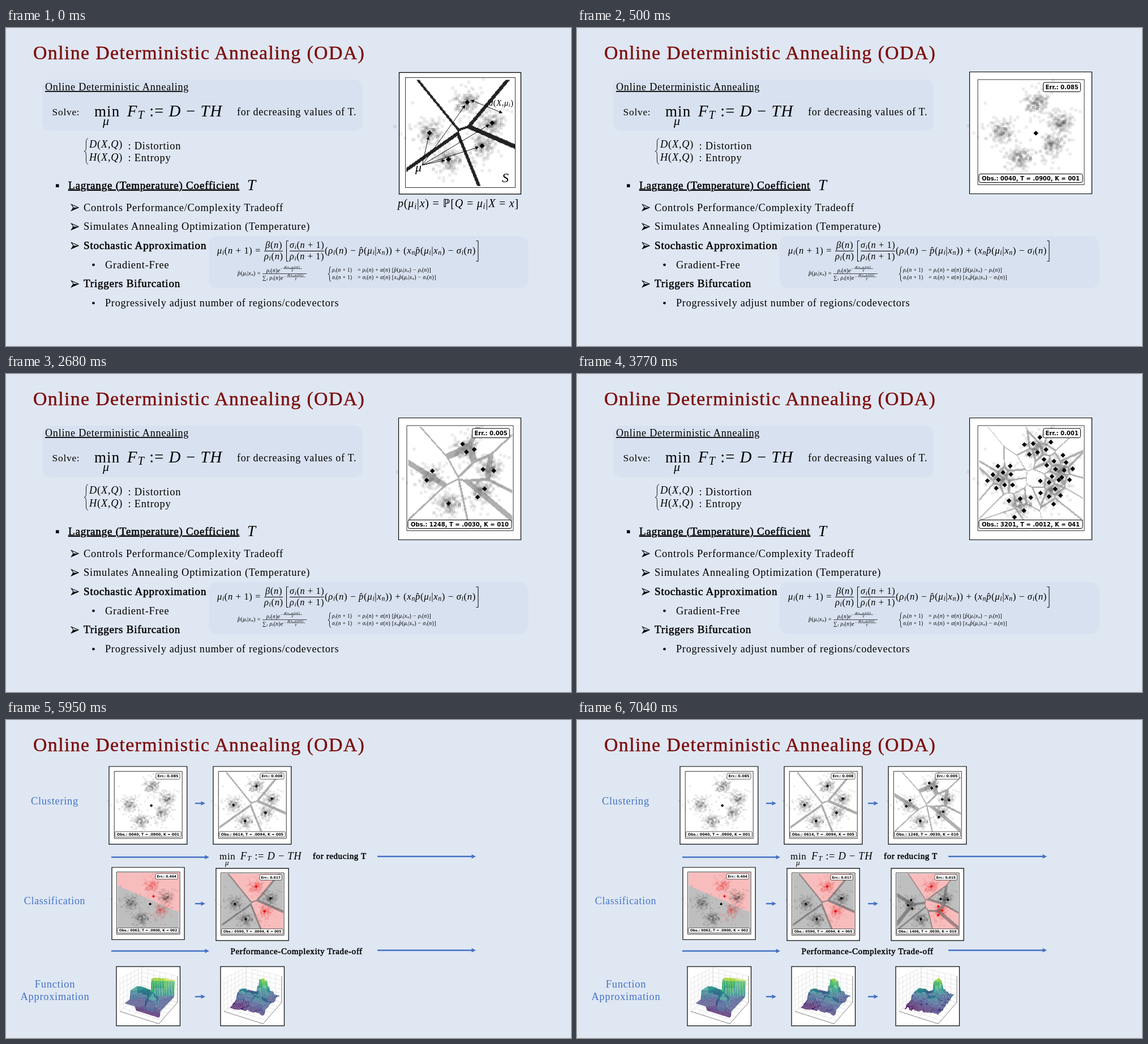
These frames come from a looping animation (998 by 561 pixels, 8000 ms). An HTML page:

```html
<!DOCTYPE html>
<html lang="en">
<head>
<meta charset="utf-8">
<title>Online Deterministic Annealing</title>
<style>
html, body { margin: 0; height: 100%; overflow: hidden; background: #dfe7f3; }
svg { display: block; width: 100vw; height: 100vh; }
text { font-family: "Liberation Serif", serif; letter-spacing: .04em; }
.i { font-style: italic; }
.sub { font-style: italic; font-size: .7em; baseline-shift: -.18em; }
.b { stroke: #000; stroke-width: .55; }
.u { text-decoration: underline; }
.title { fill: #7b0c08; stroke: #7b0c08; stroke-width: .4; }
.blue { fill: #4472c4; text-anchor: middle; }
.lab { font: bold 10px "DejaVu Sans", sans-serif; letter-spacing: 0; text-anchor: middle; }
.line { fill: none; stroke: #000; vector-effect: non-scaling-stroke; }
</style>
</head>
<body>
<svg id="stage" viewBox="0 0 998 561" preserveAspectRatio="none"></svg>
<script>
const LOOP = 8000, STEP = 1090, BLUE = '#4472c4';

let seed = 11;
const rnd = () => (seed = (seed * 16807) % 2147483647) / 2147483647;
const gauss = () => (rnd() + rnd() + rnd() + rnd() - 2) * 1.73;
const range = n => [...Array(n).keys()];

// ---------- text and line helpers ----------
const text = (x, y, size, s, cls = '') =>
  `<text x="${x}" y="${y}" font-size="${size}" class="${cls}">${s}</text>`;

// Letters become italic, "_x" becomes a subscript.
const math = (x, y, size, s) => text(x, y, size, s.replace(/_(.)|([A-Za-zα-ω]\u0302?)/g,
  (m, sub, ch) => `<tspan class="${sub ? 'sub' : 'i'}">${sub || ch}</tspan>`));

const path = (d, w = 1, col = '#000') => `<path d="${d}" fill="none" stroke="${col}" stroke-width="${w}"/>`;
const box = (x, y, w, h, r, fill) => `<rect x="${x}" y="${y}" width="${w}" height="${h}" rx="${r}" fill="${fill}"/>`;

function arrow(x1, y1, x2, y2, w, len, col, both) {
  const a = Math.atan2(y2 - y1, x2 - x1), c = Math.cos(a) * len * .8, s = Math.sin(a) * len * .8;
  const head = (x, y, angle) => `<path transform="translate(${x} ${y}) rotate(${angle * 180 / Math.PI})"
    d="M0 0L${-len} ${len / 2}V${-len / 2}z" fill="${col}"/>`;
  return path(`M${x1 + (both ? c : 0)} ${y1 + (both ? s : 0)}L${x2 - c} ${y2 - s}`, w, col) +
    head(x2, y2, a) + (both ? head(x1, y1, a + Math.PI) : '');
}
const blueArrow = (x, y, len) => arrow(x, y, x + len, y, 2.4, 7.5, BLUE);

function brace(x, y, h, w) {
  const m = y + h / 2, c = x + w / 2;
  return path(`M${x + w} ${y}Q${c} ${y} ${c} ${y + w}V${m - w}Q${c} ${m} ${x} ${m}` +
    `Q${c} ${m} ${c} ${m + w}V${y + h - w}Q${c} ${y + h} ${x + w} ${y + h}`, .9);
}

// ---------- cluster panels, local size 216 x 215 ----------
// Cluster centres: x, y, and 1 for the red class
const CENTRES = [[56, 106], [120, 54, 1], [162, 89], [145, 128, 1], [88, 151]];

// Each centre bifurcates into counts[k] code vectors on a golden-angle spiral.
const split = (counts, radius) => CENTRES.flatMap(([x, y, red], k) => range(counts[k]).map(i => {
  const n = counts[k], r = n > 1 ? radius * Math.sqrt((i + .5) / n) : 0, a = i * 2.4 + 2.6 - k;
  return [x + r * Math.cos(a), y + r * Math.sin(a), red];
}));

const clusterDefs = CENTRES.map(([cx, cy], k) => {
  const snap = v => Math.round(v / 2.5) * 2.5 - 2.7;
  const squares = range(150).map(n => {
    const sd = (n % 3 ? 9 : 17) * (k ? 1 : 1.2);
    return `<rect x="${snap(cx + gauss() * sd)}" y="${snap(cy + gauss() * sd)}" width="5.4" height="5.4"/>`;
  });
  return `<g id="c${k}" fill-opacity=".075">${squares.join('')}</g>`;
}).join('');

const scatter = twoClasses => CENTRES.map((p, k) =>
  `<use href="#c${k}" fill="${twoClasses && p[2] ? '#e00000' : '#000'}"/>`).join('');

// Cells of a fine grid for which test(nearest point, margin to the second) holds, as one path
function cells(pts, step, test) {
  let d = '';
  for (let y = 16; y < 196; y += step)
    for (let x = 17; x < 200; x += step) {
      let d1 = 1e9, d2 = 1e9, near;
      for (const p of pts) {
        const q = (p[0] - x) ** 2 + (p[1] - y) ** 2;
        if (q < d1) { d2 = d1; d1 = q; near = p; }
        else if (q < d2) d2 = q;
      }
      if (test(near, d2 - d1)) d += `M${x} ${y}h${step}v${step}h-${step}z`;
    }
  return d;
}
function borders(pts, fill) {
  const margin = pts.length < 3 ? 0 : 1250 / pts.length ** .85;
  return `<path d="${cells(pts, 1.25, (p, m) => m < margin)}" fill="${fill}"/>`;
}

const diamonds = (pts, twoClasses) => pts.map(([x, y, red]) =>
  `<path d="M${x} ${y - 4.3}l4.3 4.3l-4.3 4.3l-4.3 -4.3z" fill="${twoClasses && red ? '#f00000' : '#000'}"/>`).join('');

const label = (x, y, w, h, s) =>
  `<rect x="${x}" y="${y}" width="${w}" height="${h}" rx="3" fill="#fff" stroke="#000"/>` +
  text(x + w / 2, y + h / 2 + 3.6, 10, s, 'lab');

function panel(x, y, scale, [pts, err, obs, temp], twoClasses) {
  const k = String(pts.length).padStart(3, '0');
  const back = twoClasses ? box(17, 16, 183, 180.5, 0, '#c4c4c4') +
    `<path d="${cells(pts, 2, p => p[2])}" fill="#ffc2c2" shape-rendering="crispEdges"/>` +
    box(17, 16, 183, 180.5, 0, 'url(#dots)') : '';
  return `<g transform="translate(${x} ${y}) scale(${scale})">
    <rect class="line" width="216" height="215" style="fill:#fff" stroke-width="1.2"/>
    ${back}${scatter(twoClasses)}${borders(pts, twoClasses ? '#5558' : '#888a')}
    <rect class="line" x="14.5" y="13.5" width="188" height="185.5" stroke-width=".8"/>
    ${diamonds(pts, twoClasses)}
    ${label(130, 18.5, 66, 16.5, 'Err.: ' + err)}
    ${label(16.5, 180, 183, 15, `Obs.: ${obs}, T = ${temp}, K = ${k}`)}</g>`;
}

function annotated() {
  const rays = CENTRES.map(([x, y]) => {
    const px = 689.5 + x * 1.045, py = 74.8 + y * 1.04, a = Math.atan2(py - 242, px - 735);
    return arrow(735, 242, px - 6 * Math.cos(a), py - 6 * Math.sin(a), .9, 6, '#000');
  });
  return `<rect x="694.5" y="78.5" width="215" height="214.5" fill="#fff" stroke="#000" stroke-width="1.3"/>
    <rect x="705.5" y="87.5" width="194" height="194" fill="none" stroke="#000" stroke-width=".8"/>
    <g transform="translate(689.5 74.8) scale(1.045 1.04)">
    ${scatter()}${borders(CENTRES, '#222')}${diamonds(CENTRES)}</g>` +
    rays.join('') + arrow(821, 127, 877, 150, .9, 6, '#000', true) +
    math(723, 253, 22, 'μ') + math(876, 272, 24, 'S') + math(853, 137, 14.5, 'd(X,μ_i)') +
    math(692, 316, 20, 'p(μ_i|x) = ℙ[Q = μ_i|X = x]');
}

// ---------- surface plots ----------
const VIRIDIS = [[68, 1, 84], [59, 82, 139], [33, 145, 140], [94, 201, 98], [253, 231, 37]];
function viridis(t) {
  const s = Math.min(.999, Math.max(0, t)) * 4, i = s | 0;
  return `rgb(${VIRIDIS[i].map((c, k) => Math.round(c + (VIRIDIS[i + 1][k] - c) * (s - i)))})`;
}
const mix = (a, b, c, d, u, v) => (a * (1 - u) + b * u) * (1 - v) + (d * (1 - u) + c * u) * v;
const project = (u, v, z) => mix(6, 75, 108, 45, u, v).toFixed(1) + ' ' +
  (mix(79, 101, 63, 48, u, v) - z * (58 - 12 * v)).toFixed(1);

// Hills: u, v, height, width
const HILLS = [[.57, .85, .62, .09], [.2, .58, .36, .14], [.62, .48, .2, .13]];
const height = (u, v) => HILLS.reduce((z, [a, b, h, w]) =>
  z + h * Math.exp(-((u - a) ** 2 + (v - b) ** 2) / (2 * w * w)), .06 + .16 * u + .1 * v);

// Height is constant around each of some scattered sites; more sites give a finer surface.
function surface(x, count) {
  const sites = [...HILLS, ...range(count).map(() => [rnd(), rnd()])]
    .map(([u, v]) => [u, v, height(u, v) + (rnd() - .5) * .1]);
  const N = 30, lerp = k => .08 + .88 * k / N;
  const z = range(N + 1).map(i => range(N + 1).map(j => {
    const dist = s => (s[0] - lerp(i)) ** 2 + (s[1] - lerp(j)) ** 2;
    return sites.reduce((a, b) => dist(b) < dist(a) ? b : a)[2];
  }));
  const grid = range(7).map(k => k / 6).map(t =>
    `M${project(0, 0, t)}L${project(0, 1, t)}L${project(1, 1, t)}` +
    `M${project(0, t, 1)}L${project(0, t, 0)}L${project(1, t, 0)}` +
    `M${project(t, 1, 1)}L${project(t, 1, 0)}L${project(t, 0, 0)}`).join('');
  let quads = '';
  for (let j = N - 1; j >= 0; j--)
    for (let i = 0; i < N; i++) {
      const q = [[i, j], [i + 1, j], [i + 1, j + 1], [i, j + 1]];
      const mean = q.reduce((s, [a, b]) => s + z[a][b], 0) / 4;
      const d = q.map(([a, b]) => project(lerp(a), lerp(b), z[a][b])).join('L');
      quads += `<path d="M${d}z" fill="${viridis((mean - .08) * 1.2)}"/>`;
    }
  return `<g transform="translate(${x} 435)">
    <rect width="112.5" height="104.5" fill="#fff" stroke="#000" stroke-width="1.2"/>
    ${path(grid, .5, '#ccc')}<g fill-opacity=".86">${quads}</g>
    ${path(`M${project(0, 0, 0)}L${project(1, 0, 0)}L${project(1, 1, 0)}L${project(1, 1, 1)}`, .6, '#444')}</g>`;
}

// ---------- slides ----------
// Level 1 entries get an arrowhead, level 2 entries a dot.
const LIST = [
  [1, 18.5, 'Controls Performance/Complexity Tradeoff'],
  [1, 18.5, 'Simulates Annealing Optimization (Temperature)'],
  [1, 19.1, 'Stochastic Approximation', 'b'],
  [2, 18.5, 'Gradient-Free'],
  [1, 19.1, 'Triggers Bifurcation', 'b'],
  [2, 18.2, 'Progressively adjust number of regions/codevectors']
];
const list = LIST.map(([level, size, s, cls], k) => {
  const y = 322.5 + 33.7 * k, m = y - 5.8;
  return (level > 1 ? `<circle cx="154.5" cy="${m}" r="2.3"/>` :
    path(`M115.5 ${m - 5.5}L128 ${m}L115.5 ${m + 5.5}L119 ${m}z`, 1.1) +
    `<path d="M119 ${m}H128L115.5 ${m + 5.5}z"/>`) + text(level > 1 ? 175 : 137, y, size, s, cls);
}).join('');

// The tiny exponent -d(x,mu)/T, with its bar at height y
const exponent = (x, y) => text(x, y + 2, 7, '−') + math(x + 6, y - 1, 6.2, 'd(x_n,μ_i(n))') +
  path(`M${x + 5} ${y}h33`, .5) + math(x + 19, y + 5.5, 6, 'T');

const update = (y, s, rest) => math(576, y, 9.4, s + '_i(n + 1)') + math(621, y, 9.7, `= ${s}_i(n) + α(n) [${rest}]`);

const slideOne =
  box(64, 91, 566, 91, 15, '#d8e1f0') + box(358, 367, 564.5, 92, 15, '#d8e1f0') +
  text(69, 110, 18.2, 'Online Deterministic Annealing', 'u') +
  text(81.5, 154, 17.5, 'Solve:') + text(156, 156, 27, 'min') + math(171, 171, 22, 'μ') +
  math(214, 156, 28.6, 'F_T := D − TH') + text(408, 154, 18.1, 'for decreasing values of T.') +
  brace(138, 195, 45, 7) + math(147, 211, 18.4, 'D(X,Q)') + math(147, 234, 18.4, 'H(X,Q)') +
  text(215.5, 213.5, 18.5, ': Distortion') + text(215.5, 235, 18.5, ': Entropy') +
  box(88, 275.5, 5.5, 5.5, 0, '#000') +
  text(110, 284, 19.1, 'Lagrange (Temperature) Coefficient', 'b u') + math(426, 286, 27, 'T') + list +
  math(373, 398, 16.5, 'μ_i(n + 1) =') +
  math(458, 388, 16.5, 'β(n)') + path('M456 393.5H489') + math(456, 408, 16.5, 'ρ_i(n)') +
  path('M499 375.5H495.5V411.5H499') +
  math(501, 388, 16.2, 'σ_i(n + 1)') + path('M501 393.5H562') + math(501, 408, 16.2, 'ρ_i(n + 1)') +
  math(563, 398, 16.7, '(ρ_i(n) − p\u0302(μ_i|x_n)) + (x_np\u0302(μ_i|x_n) − σ_i(n)') +
  path('M830.5 375.5H834V411.5H830.5') +
  math(409, 436, 10, 'p\u0302(μ_i|x_n) =') + path('M453 433.5H531', .7) +
  math(460, 430.5, 9.7, 'ρ_i(n)e') + exponent(485, 424.5) +
  math(453, 444, 9.7, '∑_i ρ_i(n)e') + exponent(491, 439) + brace(569, 421, 26, 5) +
  update(430, 'ρ', 'p\u0302(μ_i|x_n) − ρ_i(n)') + update(443, 'σ', 'x_np\u0302(μ_i|x_n) − σ_i(n)');

const slideTwo =
  text(86, 149, 18.4, 'Clustering', 'blue') + text(86, 325, 17.9, 'Classification', 'blue') +
  text(86.5, 472, 18.5, 'Function', 'blue') + text(86.5, 494, 18.4, 'Approximation', 'blue') +
  [242, 407.5].map(y => blueArrow(186, y, 173) + blueArrow(656, y - 1.2, 174)).join('') +
  text(377, 246, 17, 'min') + math(387, 256, 13, 'μ') + math(414, 246, 18.4, 'F_T := D − TH') +
  text(542, 245, 15, 'for reducing T', 'b') + text(396.5, 412.5, 15.1, 'Performance-Complexity Trade-off', 'b');

// Code vectors, error, observations, temperature
const CLUSTERING = [
  [[[117, 108]], '0.085', '0040', '.0900'],
  [CENTRES, '0.008', '0614', '.0094'],
  [split([2, 3, 2, 2, 1], 15), '0.005', '1248', '.0030'],
  [split([10, 8, 10, 8, 5], 27), '0.001', '3201', '.0012']
];
const CLASSES = [
  [[[124, 86, 1], [114, 109]], '0.404', '0062', '.0900'],
  [CENTRES, '0.017', '0590', '.0094'],
  [split([3, 1, 2, 3, 1], 17), '0.015', '1406', '.0030']
];

const column = k =>
  (k ? [147, 324, 488].map(y => blueArrow(154 + 180 * k, y, 18)).join('') : '') +
  panel(182 + 184 * k, 82, .638, CLUSTERING[k]) +
  panel(187 + 184 * k, k ? 261.7 : 260, .593, CLASSES[k], true) +
  surface(195 + 184 * k, 8 + 65 * k * k);

// start, end, content
const layers = [
  [0, LOOP, text(48, 55, 33.9, 'Online Deterministic Annealing (ODA)', 'title')],
  [0, 4860, slideOne],
  [0, 500, annotated()],
  ...CLUSTERING.map((c, k) => [500 + STEP * k, 500 + STEP * (k + 1), panel(693.5, 77.5, 1, c)]),
  [4860, LOOP, slideTwo],
  ...CLASSES.map((c, k) => [4860 + STEP * k, LOOP, column(k)])
];

const stage = document.getElementById('stage');
stage.innerHTML = `<defs>${clusterDefs}<pattern id="dots" width="5" height="5" patternUnits="userSpaceOnUse">
  <rect width="3.6" height="3.6" fill-opacity=".05"/></pattern></defs>` +
  layers.map(l => `<g class="layer" display="none">${l[2]}</g>`).join('');
const groups = stage.querySelectorAll('.layer');

function draw(now) {
  const t = now % LOOP;
  layers.forEach(([from, to], k) =>
    groups[k].setAttribute('display', t >= from && t < to ? 'inline' : 'none'));
}
function tick(now) {
  draw(now);
  requestAnimationFrame(tick);
}
draw(0);
requestAnimationFrame(tick);
</script>
</body>
</html>
```
